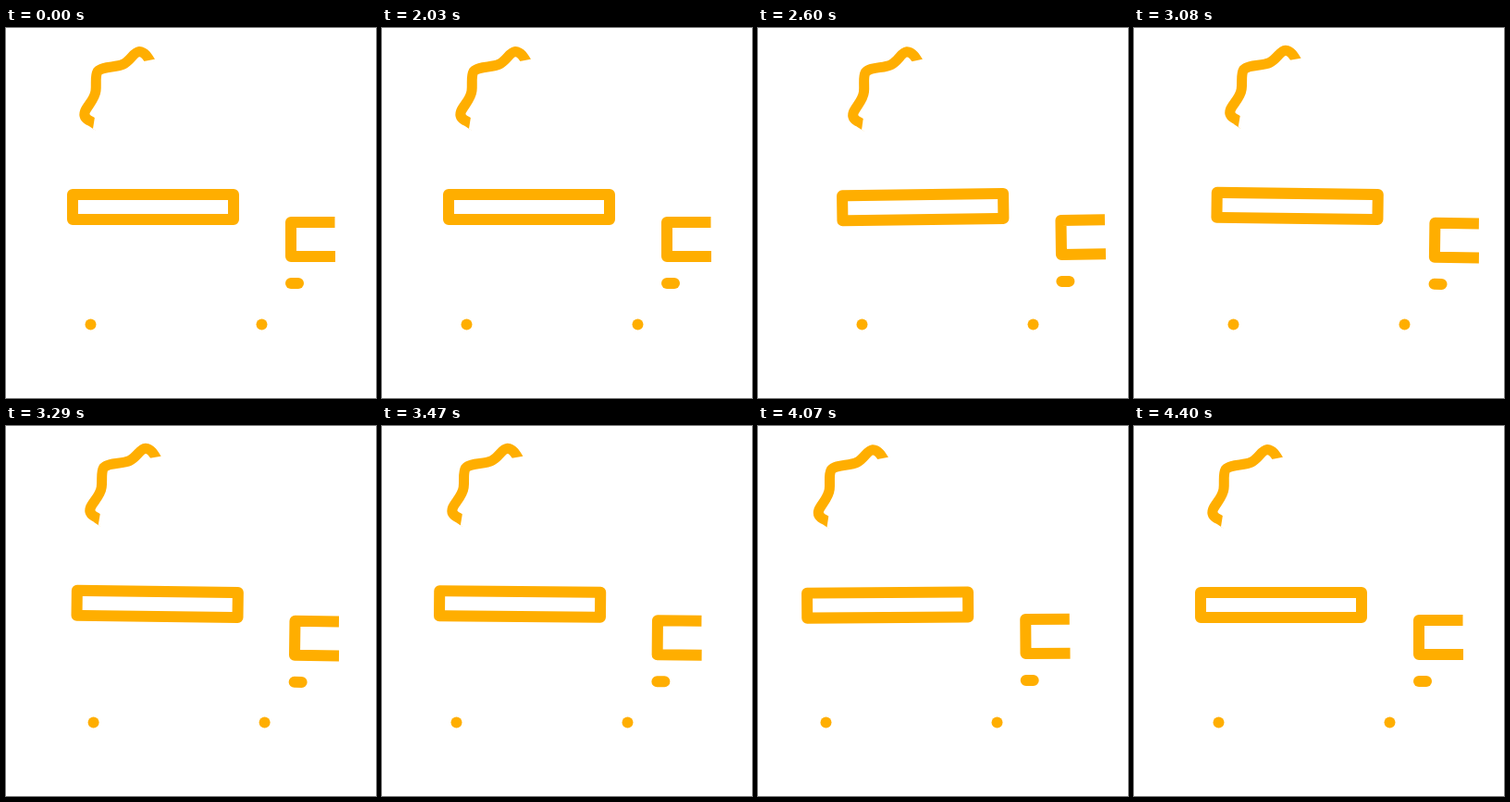
An HTML page for the animation above (4430 ms loop, 400 by 400 pixels).

```html
<!DOCTYPE html>
<html lang="en">
<head>
<meta charset="utf-8">
<title>Food truck</title>
<style>
  html, body { margin: 0; width: 100%; height: 100%; overflow: hidden; background: #fff; }
  svg { display: block; width: 100%; height: 100%; }
  .line { fill: none; stroke: #ffae00; stroke-width: 12; stroke-linejoin: round; }
</style>
</head>
<body>
<svg viewBox="0 0 400 400">
  <g id="truck">
    <g id="body">
      <path class="line" stroke-linecap="round" style="stroke-width:11"
        d="M98 105L92 101Q83 97 85.5 90C88 84 96 77 97 68C98 60 96 52 99 47C104 41 119 43 127 39C135 35 138 26 144 25.5C150 26 153 31 157 38"/>
      <path fill="#fff" d="M94 109L96 96L149 36L162 33.5L175 60L110 120Z"/>
      <rect class="line" x="72" y="180" width="174" height="27"/>
      <path class="line" d="M355.5 210H308V247H356"/>
      <path class="line" stroke-linecap="round" d="M308 276H316"/>
    </g>
    <g fill="#ffae00">
      <circle cx="91.5" cy="320.5" r="6"/>
      <circle cx="276.5" cy="320.5" r="6"/>
    </g>
  </g>
</svg>
<script>
const LOOP = 4430, START = 2030, STEP = 30;

// [time in ms, value]
const drive = [[2010, 0], [2270, 6.5], [2540, 18.8], [2600, 21], [2770, 23.3], [3080, 16],
  [3470, -11], [3620, -22], [3835, -30], [4070, -18], [4160, -12.3], [4400, 0], [LOOP, 0]];
const tilt = [[START, 0], [2600, -0.8], [3150, 0.8], [3470, 0.5], [4050, -0.4], [4400, 0], [LOOP, 0]];
const bob = [[START, 0], [2600, 0], [3080, -1], [3470, -1], [4070, 0], [LOOP, 0]];

const slope = (k, i) => (k[i + 1][1] - k[i][1]) / (k[i + 1][0] - k[i][0]);

// Tangent that never overshoots a key
function tangent(k, i) {
  if (i === 0 || i === k.length - 1) return 0;
  const a = slope(k, i - 1), b = slope(k, i);
  return a * b > 0 ? 2 * a * b / (a + b) : 0;
}

function sample(k, t) {
  if (t <= k[0][0]) return k[0][1];
  let i = 0;
  while (i < k.length - 2 && t >= k[i + 1][0]) i++;
  const [t0, a] = k[i], [t1, b] = k[i + 1];
  const d = t1 - t0, u = (t - t0) / d, v = 1 - u;
  return v * v * ((1 + 2 * u) * a + u * d * tangent(k, i)) +
    u * u * ((1 + 2 * v) * b - v * d * tangent(k, i + 1));
}

const truck = document.getElementById("truck");
const body = document.getElementById("body");

function draw(now) {
  const t = now % LOOP;
  const s = t <= START + STEP ? 0 : START + Math.floor((t - START) / STEP) * STEP;
  truck.setAttribute("transform", `translate(${sample(drive, s)} 0)`);
  body.setAttribute("transform", `translate(0 ${sample(bob, s)}) rotate(${sample(tilt, s)} 165 320)`);
  requestAnimationFrame(() => draw(performance.now() - begin));
}

const begin = performance.now();
draw(0);
</script>
</body>
</html>
```
